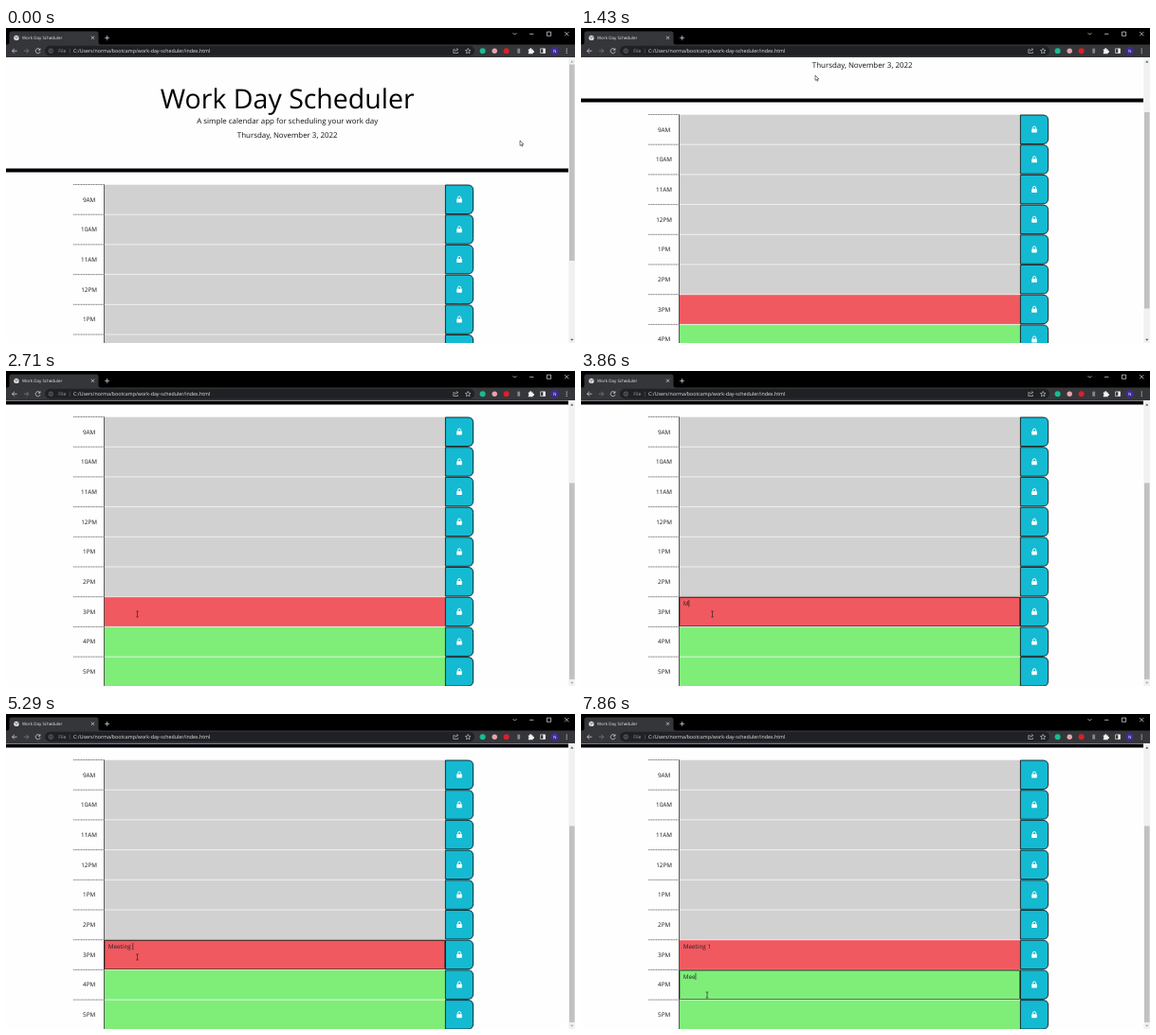
Recreate the animation shown at these times as an HTML page. Size 600x333 px, loop 8000 ms.

```html
<!DOCTYPE html>
<html lang="en">
<head>
<meta charset="utf-8">
<title>Work Day Scheduler</title>
<style>
html, body { margin: 0; width: 100%; height: 100%; overflow: hidden; background: #fff; }
svg { display: block; width: 600px; height: 333px; }
text { font-family: "Open Sans", "Noto Sans", sans-serif; text-rendering: geometricPrecision; }
.mid { text-anchor: middle; }
.line { fill: none; stroke: #e8eaed; stroke-width: .7; }
</style>
</head>
<body>
<svg id="stage" viewBox="0 0 600 333">
  <rect width="600" height="333" fill="#fefefe"/>
  <g id="page">
    <text class="mid" x="296.7" y="85.2" font-size="28.5">Work Day Scheduler</text>
    <g class="mid" font-size="7.93" fill="#111">
      <text x="296.7" y="101.2">A simple calendar app for scheduling your work day</text>
      <text x="296.7" y="115.6">Thursday, November 3, 2022</text>
    </g>
    <rect y="148.5" width="593" height="4" fill="#000008"/>
    <g id="rows"></g>
  </g>

  <rect x="593.3" y="31" width="6.7" height="302" fill="#f1f1f1"/>
  <rect id="thumb" x="594" y="38.5" width="5.6" height="207.5" fill="#c1c1c1"/>
  <path id="up" d="M595.2 36.4l1.6-1.9 1.6 1.9z"/>
  <path id="down" d="M595.2 328.8l1.6 1.9 1.6-1.9z"/>

  <g id="browser">
    <rect width="600" height="31" fill="#000"/>
    <path d="M1 17.5Q3.5 17.5 3.5 15V6Q3.5 3.5 6 3.5H95Q97.5 3.5 97.5 6V15Q97.5 17.5 100 17.5H600V31H0V17.5Z" fill="#35363a"/>
    <circle cx="11" cy="10.4" r="2.7" fill="#e8eaed"/>
    <path d="M9.2 9.2l1.7.5.3 1.2-1 1.5M12 8.4l.3 1.3 1 .4" fill="none" stroke="#35363a" stroke-width=".6"/>
    <text x="17" y="12.1" font-size="4.5" fill="#e8eaed">Work Day Scheduler</text>
    <path class="line" d="M89.9 8.7l3.2 3.2m0-3.2l-3.2 3.2M104.2 10.4h4.8m-2.4-2.4v4.8"/>
    <path class="line" d="M534.6 5.2l1.9 1.9 1.9-1.9M552 6.3h4.4M570.4 4.1h4.2v4.2h-4.2zM589.2 4.1l4.2 4.2m0-4.2l-4.2 4.2"/>

    <path class="line" d="M11.6 24.2H6.6m2.3-2.4l-2.4 2.4 2.4 2.4"/>
    <path class="line" d="M18.8 24.2h5m-2.3-2.4l2.4 2.4-2.4 2.4" style="stroke:#85868a"/>
    <path class="line" d="M35.7 22.7a2.5 2.5 0 1 0 .4 2.3M36 21.4v1.9h-1.9"/>
    <rect x="41" y="18.8" width="453" height="10.6" rx="5.3" fill="#202124"/>
    <circle class="line" cx="47.3" cy="24.2" r="2.2" style="stroke:#9aa0a6;stroke-width:.5"/>
    <path class="line" d="M47.3 23.8v1.5m0-2.4v.5" style="stroke:#9aa0a6"/>
    <text x="55.3" y="26" font-size="5.1" fill="#9aa0a6">File</text>
    <path d="M67.3 21.7v5" stroke="#6b6e72" stroke-width=".5"/>
    <text x="71" y="26" font-size="5.27" fill="#e8eaed">C:/Users/norma/bootcamp/work-day-scheduler/index.html</text>
    <path class="line" d="M473.6 22.7h-1.8v3.8h4.6v-1.4M473.4 25q.3-2.3 3-2.3m-1.1-1.3l1.4 1.3-1.4 1.3" style="stroke-width:.55"/>
    <path class="line" d="M487.2 21.5l.8 1.8 2 .2-1.5 1.3.4 2-1.7-1-1.7 1 .4-2-1.5-1.3 2-.2z" style="stroke-width:.55"/>
    <circle cx="502.6" cy="24.2" r="3" fill="#14bf90"/>
    <circle cx="515.2" cy="24.2" r="2.7" fill="#e5a5ad"/>
    <circle cx="527.6" cy="24.2" r="3" fill="#d9202a"/>
    <rect x="539.3" y="21.7" width="2.8" height="5" fill="#85868a"/>
    <path d="M550.8 22.5h1.5a1 1 0 1 1 1.9 0h1.5v1.5a1 1 0 1 1 0 1.9v1.4h-4.9v-1.5a1 1 0 0 0 0-1.8z" fill="#f1f3f4"/>
    <path class="line" d="M563.6 21.9h4.8v4.6h-4.8z"/>
    <path d="M566.3 21.8h2.3v4.8h-2.3z" fill="#f1f3f4"/>
    <circle cx="578.6" cy="24.2" r="4.3" fill="#3f2b96"/>
    <text class="mid" x="578.6" y="25.8" font-size="4.5" fill="#fff">N</text>
    <g fill="#e8eaed"><circle cx="591.2" cy="22.1" r=".6"/><circle cx="591.2" cy="24.2" r=".6"/><circle cx="591.2" cy="26.3" r=".6"/></g>
  </g>

  <path id="arrow" d="M0 0V5.4L1.3 4.3 2.1 6.1 3 5.7 2.2 4H3.8Z" fill="#fff" stroke="#111" stroke-width=".55"/>
  <path id="beam" d="M-1.3 -3h2.6M0 -3v6M-1.3 3h2.6" fill="none" stroke="#222" stroke-width=".65"/>
</svg>
<script>
const LOOP = 8000, ROW = 31.7, TOP = 165.5, FONT = 6.34;
const GREY = '#d1d1d1', RED = '#f0595f', GREEN = '#7fee78';
const hours = ['9AM', '10AM', '11AM', '12PM', '1PM', '2PM', '3PM', '4PM', '5PM'];
const $ = id => document.getElementById(id);

function add(parent, tag, attrs, text = '') {
  const el = document.createElementNS('http://www.w3.org/2000/svg', tag);
  for (const key in attrs) el.setAttribute(key, attrs[key]);
  el.textContent = text;
  return parent.appendChild(el);
}

function buildRow(label, i) {
  const g = add($('rows'), 'g', { transform: `translate(0 ${TOP + i * ROW})` });
  const fill = i < 6 ? GREY : i === 6 ? RED : GREEN;
  add(g, 'path', { d: 'M71 0H103.5', stroke: '#333', 'stroke-width': .6, 'stroke-dasharray': '1.2 .4' });
  add(g, 'text', { class: 'mid', x: 87.6, y: 18, 'font-size': FONT, fill: '#16181b' }, label);
  add(g, 'rect', { x: 103.5, y: 0, width: 360, height: ROW, fill });
  add(g, 'path', { d: 'M104 0H463', stroke: '#f4f4f4', 'stroke-width': .8 });
  add(g, 'path', { d: `M103.5 0V${ROW}`, stroke: '#222', 'stroke-width': .7 });
  add(g, 'path', {
    d: 'M463.4 .5H487Q492.6 .5 492.6 6V25.4Q492.6 31 487 31H463.4Z',
    fill: '#14bad2', stroke: '#0b1a1d', 'stroke-width': .9
  });
  add(g, 'rect', { x: 475.2, y: 15.1, width: 5.6, height: 4, rx: .6, fill: '#fff' });
  add(g, 'path', { d: 'M476.4 15.4v-1.3a1.6 1.6 0 0 1 3.2 0v1.3', fill: 'none', stroke: '#fff', 'stroke-width': .9 });
  const ring = add(g, 'rect', {
    x: 103.8, y: .5, width: 359.2, height: ROW - 1, rx: .6, fill: 'none', stroke: '#151515', 'stroke-width': 1
  });
  const note = add(g, 'text', { x: 107.8, y: 9.2, 'font-size': FONT, fill: '#24202a' });
  note.style.whiteSpace = 'pre';
  const caret = add(g, 'path', { d: 'M0 3.4v7.2', stroke: '#111', 'stroke-width': .6 });
  return { ring, note, caret };
}
const rows = hours.map(buildRow);

// time, x, y of the pointer
const pointer = [
  [0, 542, 119], [710, 530, 114], [860, 465, 96], [1000, 362, 72], [1140, 280, 54],
  [1290, 248.6, 48.8], [1430, 247, 50], [1570, 235.5, 62], [1860, 232, 72], [2000, 219, 104],
  [2140, 197, 151], [2290, 172, 199], [2430, 152, 236], [2570, 141, 254], [2710, 138.5, 257],
  [6000, 138, 264], [6140, 135, 284], [6290, 133, 297]
];
const scroll = [[0, 0], [1430, 74], [1570, 117]];
const focus = [[0, -1], [3000, 6], [6570, 7]];
const caretOn = [[0, 0], [3000, 1], [3430, 0], [3860, 1], [6140, 0], [6570, 1], [7140, 0], [7570, 1]];
const typing = {
  6: ['Meeting 1', [3860, 4000, 4290, 4430, 4570, 4860, 5000, 5290, 5570]],
  7: ['Meeting', [7570, 7710, 7860]]
};

const at = (steps, t) => steps.findLast(s => s[0] <= t).slice(1);
const show = (el, on) => el.setAttribute('visibility', on ? 'visible' : 'hidden');

function draw(t) {
  const [offset] = at(scroll, t), [active] = at(focus, t), [lit] = at(caretOn, t), [x, y] = at(pointer, t);
  $('page').setAttribute('transform', `translate(0 ${-offset})`);
  $('thumb').setAttribute('y', 38.5 + offset * .683);
  $('up').setAttribute('fill', offset > 0 ? '#505050' : '#a3a3a3');
  $('down').setAttribute('fill', offset < 117 ? '#505050' : '#a3a3a3');

  rows.forEach(({ ring, note, caret }, i) => {
    show(ring, i === active);
    show(caret, i === active && lit);
    if (!typing[i]) return;
    const [words, keys] = typing[i];
    const typed = words.slice(0, keys.filter(k => k <= t).length);
    if (note.textContent !== typed) note.textContent = typed;
    const end = 108.1 + (typed ? note.getComputedTextLength() : 0);
    caret.setAttribute('transform', `translate(${end} 0)`);
  });

  const overText = t >= 1570;
  show($('arrow'), !overText);
  show($('beam'), overText);
  $(overText ? 'beam' : 'arrow').setAttribute('transform', `translate(${x} ${y})`);
}

const start = performance.now();
function tick() {
  draw((performance.now() - start) % LOOP);
  requestAnimationFrame(tick);
}
tick();
</script>
</body>
</html>
```
